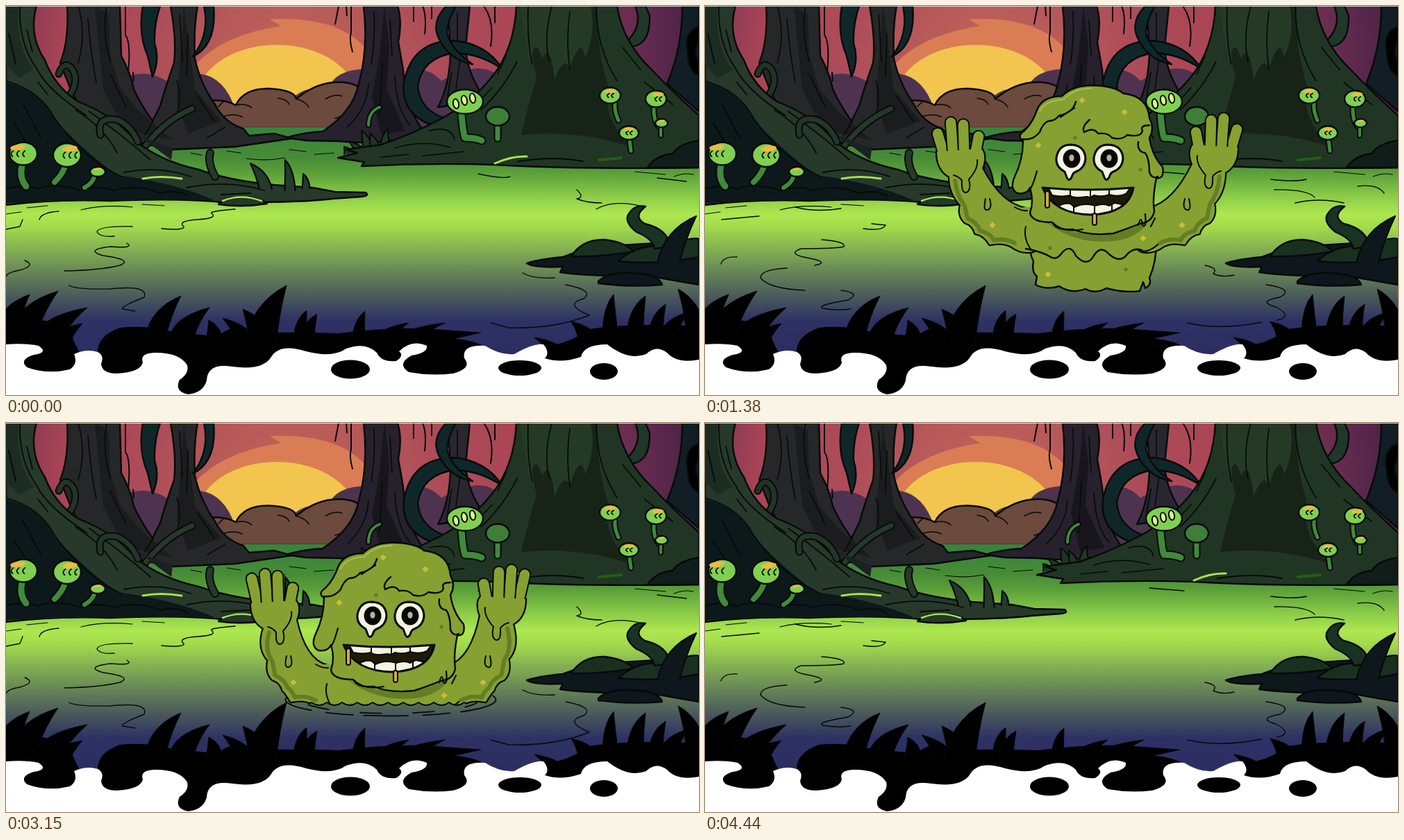
Write an HTML page with a canvas that moves like this. It is 998x561 px and loops after 4500 ms.

```html
<!DOCTYPE html>
<html lang="en">
<head>
<meta charset="utf-8">
<title>Swamp</title>
<style>
html, body { margin: 0; width: 100%; height: 100%; overflow: hidden; background: #fff }
canvas { display: block; width: 100vw; height: 100vh }
</style>
</head>
<body>
<canvas id="stage" width="998" height="561"></canvas>
<script>
const W = 998, H = 561, LOOP = 4500;
const INK = '#060a08', SLIME = '#86a131', SHADE = '#657d25', BONE = '#f5f3e1', GOLD = '#d9a838';
const GLOW = '#a8e44d', MOSS = '#213525', BANK = '#26392b', DARK = '#0c181a', TEAL = '#10272a', CAP = '#80d050', STEM = '#3f8a3b';
let g;

const layer = () => Object.assign(document.createElement('canvas'), { width: W, height: H });
const use = canvas => {
  g = canvas.getContext('2d');
  g.lineCap = g.lineJoin = 'round';
  return g;
};
const fill = (d, c) => { g.fillStyle = c; g.fill(new Path2D(d)); };
const ink = (d, w = 2, c = INK) => { g.lineWidth = w; g.strokeStyle = c; g.stroke(new Path2D(d)); };
const shape = (d, c, w = 2.4) => { fill(d, c); ink(d, w); };
const tube = (d, w, c) => { ink(d, w + 4); ink(d, w, c); };
const oval = (x, y, rx, ry, c, w = 0, turn = 0) => {
  g.beginPath();
  g.ellipse(x, y, rx, ry, turn, 0, 7);
  g.fillStyle = c; g.fill();
  if (w) { g.lineWidth = w; g.strokeStyle = INK; g.stroke(); }
};
const mirrored = (width, paint) => {
  g.save(); g.translate(width, 0); g.scale(-1, 1);
  paint();
  g.restore();
};
// A crescent leaf: the back edge bulges, the edge under the tip is hollow.
const blade = (x, y, w, tx, ty, c = '#000', line = 1) => {
  const dx = tx - x, dy = ty - y, half = (dx < 0 ? -w : w) / 2;
  shape(`M${x - half} ${y}Q${x - half + dx * .25} ${y + dy * .7} ${tx} ${ty}Q${x + half * .5 + dx * .4} ${y + dy * .5} ${x + half} ${y}`, c, line);
};
const ramp = (gradient, stops) => {
  for (const [at, c] of stops) gradient.addColorStop(at, c);
  return gradient;
};

function mushroom(x, y, rx, ry, stem, w, marks = 2, shift = 0) {
  tube(stem, w, STEM);
  oval(x, y, rx, ry, CAP, 2.4);
  oval(x + shift, y - ry * .55, rx * .55, ry * .24, '#f0b944', 0, -.12);
  for (let i = 0; i < marks; i++) {
    const mx = x + shift + (i - (marks - 1) / 2) * rx * .42;
    ink(`M${mx + 2} ${y - ry * .25}Q${mx - 4} ${y} ${mx + 1} ${y + ry * .25}`, 1.8);
  }
}

function sky() {
  g.fillStyle = ramp(g.createRadialGradient(410, 100, 60, 420, 80, 560), [
    [0, '#bd6159'], [.3, '#ad4c59'], [.55, '#a94554'], [.7, '#843655'], [.93, '#5a284c'], [1, '#4e2447']]);
  g.fillRect(0, 0, W, 190);
  fill('M250 120Q282 46 396 29L380 19Q482 14 522 66V130Z', '#da7d55');
  oval(390, 138, 117, 82, '#f2c54e');
  fill('M155 112Q198 82 240 114V180H155ZM262 98Q306 92 326 138V180H262ZM412 134Q432 113 462 122Q474 90 520 91V180H412ZM575 100Q604 82 627 108Q680 78 705 98Q740 90 744 110V175H575Z', '#4d3350');
  shape('M260 176V148Q300 127 331 143Q342 119 378 119Q416 121 418 134Q450 107 486 110Q506 112 514 122V176Z', '#6c4a3e');
  ink('M331 143Q346 140 354 147M392 133Q404 134 408 142M310 160Q330 154 340 160M418 134Q432 138 436 146M460 134Q474 126 484 130M474 162L496 155', 1.5);
}

function water() {
  g.fillStyle = ramp(g.createLinearGradient(0, 175, 0, 500), [
    [0, '#36843c'], [.13, '#478b37'], [.2, '#5a9f39'], [.3, '#88c947'], [.385, '#ade750'], [.44, '#a3dc4b'],
    [.53, '#86b551'], [.64, '#688656'], [.75, '#4a5a5b'], [.86, '#2d3164'], [1, '#2b2e61']]);
  g.fillRect(0, 175, W, 330);
}

function backTrees() {
  shape('M88 0Q91 50 78 82L95 125 130 185 240 207 330 203Q372 197 412 191L386 184 350 187 342 177Q314 168 301 142Q280 112 272 76Q270 30 276 0H237Q246 50 242 82Q230 116 222 144L211 166Q194 142 184 120Q180 98 166 72L164 0Z', '#252728');
  fill('M128 0L148 12 150 70 164 118 190 150 240 194 170 178 140 120ZM256 0L264 58 272 120 310 166 262 184 246 140Z', '#1a1c1e');
  ink('M104 0Q116 40 104 82M118 18Q122 70 130 110M145 0Q138 36 150 80M150 98L173 146M250 12L254 80M262 40L260 102M246 108Q256 140 240 170M276 130L300 166M212 166L200 186M315 175L290 190M306 145L313 138', 1.6);
  shape('M636 0L640 62Q640 112 622 146L692 136Q664 100 662 60L668 0Z', '#292630');
  ink('M650 10V62M654 75L648 120M642 95L636 130', 1.6);
  shape('M515 0Q522 62 508 112Q500 152 456 181Q424 183 404 190L432 194 480 195Q540 202 604 184Q575 148 572 92L565 52Q571 22 564 0Z', '#26212c');
  fill('M545 0L552 60 548 120 575 180 540 185 527 130 538 70Z', '#18161d');
  ink('M530 8Q532 48 526 84M553 20L556 72M522 112Q520 148 492 174M542 84L538 158M560 100Q562 150 582 172', 1.6);
  shape('M197 0Q190 40 204 72L211 102Q222 78 214 54Q213 26 222 0Z', TEAL);
  shape('M285 0Q294 40 269 73Q304 56 299 0Z', TEAL);
  shape('M622 174Q568 160 573 110Q585 50 645 50Q692 54 715 91Q682 68 645 68Q600 74 593 115Q596 150 632 162Z', TEAL);
  shape('M634 0Q612 22 623 46Q638 78 672 84Q640 62 635 38Q636 20 648 0Z', TEAL);
  shape('M906 0Q920 32 886 58Q928 66 927 14L921 0Z', '#20372a');
  shape('M974 0Q974 60 952 112L998 152V0Z', '#121e26');
  shape('M998 30Q976 38 982 66Q982 94 998 100V82Q988 66 998 50Z', '#000');
  ink('M172 0V42Q180 52 176 96M183 96L184 108M497 0V38Q494 48 499 66M479 0L474 26M587 0V22M600 0Q606 14 603 40M613 0V18M688 0Q704 22 698 58M704 0V24M490 0L491 14', 2);
}

function rightBank() {
  tube('M522 172Q522 152 538 146', 4, STEM);
  for (const [x, tx, ty] of [[495, 487, 203], [512, 494, 195], [522, 512, 180], [532, 524, 184], [545, 550, 177]])
    blade(x, 214, 16, tx, ty, MOSS, 2);
  shape('M735 0Q732 62 700 102Q670 140 624 164Q582 186 540 200L490 207 506 212 478 219 516 225 512 231Q610 226 705 229Q830 236 998 233V158Q960 124 930 92Q888 52 880 0Z', MOSS);
  fill('M764 0Q752 60 764 104Q752 142 742 186Q826 178 902 204Q856 160 868 118Q850 64 852 0Z', '#172316');
  fill('M740 0L754 82Q762 40 772 76Q784 50 790 106Q804 70 812 90Q828 40 834 74Q850 40 842 0Z', '#243a26');
  ink('M752 0Q750 50 758 84M786 0Q774 44 782 80M812 8Q806 50 812 92M850 0Q850 60 880 108M736 80Q716 120 684 150M720 72L708 98M610 180Q640 172 646 192M560 205Q600 192 640 204M600 216L660 210M888 60L914 92M920 110L960 142M700 118L670 150M540 218L580 214', 1.7);
  shape('M924 233Q936 215 960 213Q970 198 998 194V233Z', '#111d1b');
  ink('M704 227Q728 216 750 217', 3, GLOW);
  ink('M738 224Q790 216 831 224', 2);
  ink('M854 222L886 219', 4, '#245f0d');
  tube('M656 155Q658 182 661 190Q676 190 685 194', 9, STEM);
  oval(661, 138, 26, 17.5, CAP, 2.4);
  for (const [x, y] of [[648, 141], [660, 136], [672, 133]]) oval(x, y, 4, 7, '#dcf58b', 2, -.2);
  tube('M708 170V191', 7, STEM);
  oval(708, 159, 17, 13.5, '#3f7e39', 2.4);
  mushroom(870, 129, 15, 11.5, 'M877 141Q876 152 882 165', 5);
  mushroom(936, 134, 15, 12, 'M933 146Q932 164 940 174', 5, 2, 3);
  mushroom(944, 169, 9, 6, 'M943 176V187', 4, 0);
  mushroom(897, 183, 14, 10, 'M898 194L900 209', 5);
}

function leftBank() {
  tube('M82 142Q108 112 96 92Q84 76 76 98', 7, MOSS);
  tube('M192 214Q222 168 268 148', 7, '#25382a');
  fill('M190 186L240 206 238 222Z', '#1b2023');
  shape('M44 0Q32 42 56 78Q70 116 104 138Q156 158 186 194Q222 224 278 236Q322 252 386 258L442 262 474 268 518 269Q524 274 512 275L470 278Q420 284 310 283Q250 277 150 281Q70 278 0 287V0Z', BANK);
  fill('M0 110Q50 122 74 168Q118 214 160 244Q240 254 300 280Q150 279 0 284Z', DARK);
  fill('M0 0H18Q14 60 40 92L18 104 0 84Z', '#1c2c23');
  ink('M0 108Q50 122 70 162Q112 220 166 246M20 0Q18 54 44 90Q60 122 116 158M4 40L14 84M30 34L38 66M46 110L60 128M24 140L50 190M12 170L30 198M100 150Q142 176 160 212M120 152Q172 190 208 222M170 240Q220 230 266 246M260 262Q320 250 372 266M310 272L352 270M0 264Q24 256 46 264Q70 254 108 266Q132 258 156 266Q190 256 222 270Q246 264 262 274', 1.8);
  tube('M136 186Q130 158 160 164Q180 172 190 196', 7, '#22362a');
  tube('M301 246Q290 226 294 212', 8, BANK);
  for (const [x, y, w, tx, ty] of [[374, 264, 18, 352, 227], [409, 266, 15, 402, 222], [432, 263, 11, 428, 242]])
    blade(x, y, w, tx, ty, BANK, 2.2);
  ink('M197 249Q222 244 253 249', 3, GLOW);
  shape('M306 286Q316 275 341 275Q366 276 376 285Q340 291 306 286Z', '#22392a');
  ink('M312 281Q338 270 368 281', 2.6, GLOW);
  mushroom(25, 213, 20, 16.5, 'M23 231Q19 248 29 260', 9, 3, -8);
  mushroom(88, 215, 20, 17, 'M84 234Q80 244 70 254', 8, 3, 4);
  mushroom(132, 239, 11, 7, 'M127 247Q124 256 113 262', 6, 0);
}

function island() {
  shape('M750 371Q768 365 802 362L840 348Q900 344 998 338V402Q962 396 930 390Q840 390 798 384L802 376Q760 378 750 371Z', '#0d171c');
  shape('M814 361Q830 336 862 337Q890 340 904 354Q860 362 814 361ZM882 368Q908 343 946 347Q990 332 998 336V362Q940 374 882 368Z', '#193021');
  shape('M934 350Q932 336 908 326Q888 310 898 298Q906 286 921 289Q902 304 920 314Q954 322 956 347Z', '#193323');
  blade(954, 370, 32, 994, 303, '#0d171c', 2);
  shape('M853 397Q866 384 898 385Q940 386 945 402Q900 406 853 400Z', '#0d171c');
}

function foreground() {
  fill('M0 455Q50 446 92 464Q96 484 108 503L132 502Q130 476 164 464Q204 460 240 470L300 476Q360 468 480 472Q560 462 618 466L686 471 646 480Q688 482 704 506L780 500 768 492Q812 488 838 466Q910 456 998 462V561H0Z', '#000');
  for (const b of [
    [2, 464, 34, 34, 416], [26, 468, 40, 75, 411], [64, 472, 42, 117, 435], [76, 484, 34, 110, 458],
    [216, 474, 30, 252, 418], [254, 474, 36, 293, 435], [300, 482, 24, 292, 453], [312, 484, 22, 336, 462],
    [346, 484, 28, 312, 450], [366, 484, 32, 341, 437], [366, 490, 46, 404, 403], [424, 478, 20, 433, 439],
    [434, 480, 20, 448, 444], [508, 478, 18, 517, 440], [548, 476, 26, 580, 457], [582, 478, 34, 632, 457],
    [790, 496, 24, 761, 478], [836, 476, 26, 814, 455], [870, 470, 22, 875, 416], [906, 470, 24, 921, 418],
    [936, 470, 20, 950, 430], [954, 472, 24, 984, 441], [994, 470, 28, 968, 408]]) blade(...b);
  fill('M0 488Q28 486 47 490Q62 500 40 503Q18 510 30 521Q60 532 92 524Q104 516 98 502Q116 494 132 499Q142 504 137 516Q138 530 160 530Q194 528 197 514Q192 500 216 500Q250 500 261 518Q264 530 250 539Q242 556 262 560Q284 558 289 540Q290 514 326 520Q370 526 382 506Q394 486 432 498Q470 508 490 494Q518 484 534 500Q540 514 562 512Q574 504 566 498Q584 480 606 490Q608 500 584 504Q562 516 580 528Q612 534 644 530Q672 522 660 508Q656 488 690 490Q712 504 732 502Q760 486 774 488Q784 500 776 508Q800 516 828 506Q832 488 866 488Q896 512 922 502Q936 488 952 500Q966 516 998 510V561H0Z', '#fff');
  oval(496, 524, 28, 13.5, '#000');
  oval(740, 522, 31, 11, '#000');
  oval(861, 527, 20, 12, '#000');
}

const FAR_WAVES = 'M266 212L282 215M318 209L338 212M346 220Q374 224 402 219M408 207L432 210M444 214L472 212M0 300L22 297M30 291L60 288M108 294Q140 286 182 290M196 286L228 288M906 239L950 243M962 246Q976 240 990 243';
const WAVES = [
  'M174 342Q186 350 150 347Q112 352 140 360Q184 366 164 374Q136 381 84 382M91 403Q100 409 150 408Q206 402 199 420Q164 434 168 437L186 440M182 318Q132 317 131 326Q136 334 156 332M224 321Q258 324 256 318Q246 310 276 308Q306 306 296 299Q292 296 330 293M27 367Q44 374 20 381Q2 384 0 390M0 322L20 318 24 308M48 308Q50 298 76 296M680 242Q716 250 726 246M822 265Q834 276 822 278Q836 284 858 284M850 293Q876 278 920 290M938 248L980 253M744 385Q760 394 790 392M806 402Q848 410 832 422Q802 430 840 446Q790 466 724 464L698 457',
  'M168 337Q204 340 200 347Q190 350 138 350Q116 358 152 364Q180 370 158 374M118 378Q80 380 80 392Q92 408 144 410M196 410Q226 414 206 424Q158 432 170 436Q190 440 210 437M23 372Q26 361 46 362M228 321Q256 325 260 316L240 314M130 290Q160 298 196 292M24 308L78 303M640 238L690 242M815 250Q850 254 866 250M820 265Q866 264 878 276M850 284Q884 276 920 284M940 260Q968 256 978 270M720 374Q740 378 732 386Q744 392 762 388M808 402Q850 408 828 420Q794 426 822 434Q848 448 824 453M695 457Q740 468 802 456',
  'M222 308Q264 314 263 321Q240 328 194 325M130 330Q192 340 188 346Q180 350 158 348M25 373Q44 377 25 386M82 395Q80 384 112 380M155 370L164 367M116 408Q150 413 185 410Q200 418 200 426M168 438Q182 441 192 437M50 306L72 302M140 294L186 290M700 240Q730 238 746 244M812 262Q844 262 848 275M856 256Q886 268 926 262M874 288L914 286M946 272L984 276M737 382Q736 378 744 377M800 400Q854 408 838 420Q804 430 838 445Q800 474 710 457'];

function ripple(cx, cy, rx, ry) {
  g.lineWidth = 1.8; g.strokeStyle = INK;
  for (const k of [1, .84]) {
    g.setLineDash(k === 1 ? [rx * .42, rx * .1, rx * .26, rx * .14] : [rx * .2, rx * .3]);
    g.beginPath();
    g.ellipse(cx, cy, rx * k, ry * k, 0, -.25, Math.PI + .3);
    g.stroke();
  }
  g.setLineDash([]);
}

const speck = (x, y, c = '#cbbd3c', r = 4.5) => fill(`M${x - r} ${y}L${x} ${y - r}L${x + r} ${y}L${x} ${y + r}Z`, c);

function mound(sx, sy) {
  g.save();
  g.translate(562, 392); g.scale(sx, sy); g.translate(-562, -392);
  shape('M445 385Q478 372 488 352Q524 344 542 324Q562 316 582 332Q600 336 608 350Q636 356 642 370Q658 382 683 384Q676 392 650 389Q624 386 600 395Q584 386 570 391Q556 402 546 397Q530 392 520 402Q514 386 494 388Q466 392 445 385Z', SLIME);
  ink('M486 353Q500 352 505 359Q516 342 524 352Q536 346 538 364Q548 374 560 362Q566 376 578 374Q590 360 600 372Q606 364 620 366M540 326Q532 338 544 343Q554 330 560 344Q574 338 582 350Q594 344 606 352', 2);
  ink('M494 348Q520 340 546 324M588 340L602 350', 2, '#a9bb45');
  speck(560, 331); speck(510, 357); speck(604, 377); speck(538, 384, SHADE); speck(640, 379);
  g.restore();
}

// Fingers go over the outline of the limb and under its fill, so they grow out of the palm.
function limb(outline, fingers) {
  ink(outline, 4.5);
  for (const f of fingers) tube(f, 14.5, SLIME);
  fill(outline, SLIME);
}

function arm(s, lift) {
  const y = -s * .42 - lift, m = s / 2, n = y / 3;
  const finger = (x, y0, tx, ty) => `M${x + s} ${y0 + y}L${tx + s} ${ty + y}`;
  limb(`M${334 + s} ${210 + y}Q${334 + s} ${236 + y} ${352 + s} ${246 + y}Q${352 + m} ${270 + n} ${368 + m} ${287 + n}Q${364 + m} 302 ${374 + m} 312Q${386 + m} 316 ${389 + m} 328Q402 330 410 344Q428 340 440 346Q456 358 472 354L510 330 462 292Q${426 + m / 2} ${286 + n} ${399 + s} ${234 + y}Q${406 + s} ${216 + y} ${398 + s} ${206 + y}Z`,
    [finger(344, 214, 335, 184 - s * .5), finger(357, 208, 354, 168), finger(373, 208, 372, 171), finger(388, 220, 394, 188)]);
  ink(`M${360 + s} ${252 + y}Q${362 + m} ${272 + n} ${374 + m} ${288 + n}L${378 + m} 306Q${392 + m} 312 ${396 + m} 324Q412 328 416 338Q432 334 446 342`, 6, SHADE);
  ink(`M${358 + s} ${244 + y}Q${366 + s} ${246 + y} ${370 + s} ${252 + y}Q${369 + s} ${270 + y} ${376 + s} ${269 + y}Q${384 + s} ${266 + y} ${380 + s} ${250 + y}Q${394 + s} ${234 + y} ${392 + s} ${222 + y}M404 278Q400 296 407 294Q414 292 410 278`, 2);
  speck(414, 316);
}

function meltedArm() {
  limb('M324 220Q326 240 336 250Q334 280 341 282Q348 272 346 252L354 256Q354 280 363 296Q362 336 373 340Q380 332 378 312Q392 316 394 332Q404 318 412 328Q416 358 424 342Q436 330 444 348Q456 356 476 350L520 310 464 268Q402 264 375 218L360 210 338 208Z',
    ['M338 230L329 216', 'M342 218L336 190', 'M352 214L348 178', 'M366 222L371 186']);
  ink('M352 232Q364 240 358 256Q366 262 368 250Q374 262 384 264M392 264Q388 282 396 280Q402 272 408 278Q412 296 418 280Q424 268 432 274Q434 296 442 290Q444 274 456 270M386 300Q420 316 444 322', 2);
}

function eye(x, dot) {
  shape(`M${x - 9} 239Q${x - 22} 232 ${x - 21} 219Q${x - 18} 200 ${x} 200Q${x + 20} 201 ${x + 21} 220Q${x + 20} 234 ${x + 7} 239Q${x + 3} 240 ${x + 1} 247Q${x - 3} 254 ${x - 6} 247Z`, BONE, 3);
  oval(x + 1, 220, 12.5, 13.5, '#080803');
  oval(x + 1, 219, 3.6, 4.8, dot);
}

function face(melted) {
  const dot = melted ? '#35331f' : '#b5b29a';
  eye(527, dot); eye(581, dot);
  g.save();
  if (melted) { g.translate(554, 272); g.scale(.84, .76); g.translate(-552, -281); }
  const mouth = new Path2D('M486 262Q550 268 617 262Q610 299 556 301Q502 300 486 262Z');
  g.fillStyle = '#1c1907'; g.fill(mouth);
  g.save(); g.clip(mouth);
  shape('M492 258L500 273Q514 276 526 273Q530 278 550 275Q556 277 560 273Q572 276 582 272Q596 276 606 271L616 258ZM508 300V290Q514 284 526 285L532 290Q544 284 558 287L562 288Q574 284 582 288L590 284 600 286 604 304H508Z', BONE, 2);
  ink('M526 258V273M555 258V274M582 258V272M531 288V303M561 287V303M586 287V303', 2);
  g.restore();
  g.lineWidth = 3; g.strokeStyle = INK; g.stroke(mouth);
  tube('M493 270V288', 4, GOLD);
  tube('M561 302V313', 4, GOLD);
  g.restore();
}

function creature(dy, reach, melted) {
  g.save();
  g.translate(0, dy);
  shape('M470 340Q466 356 473 368Q470 384 478 390L476 402Q492 410 510 404Q528 416 548 408Q562 416 578 407Q604 414 626 411L631 398 634 407Q644 402 640 392Q650 370 650 340Z', SLIME);
  if (melted) {
    meltedArm();
    mirrored(1118, meltedArm);
  } else {
    arm(reach, 0);
    mirrored(1101, () => arm(reach, 6));
  }
  const hem = 'M462 350Q484 354 496 361Q506 368 514 356Q526 342 534 360Q550 378 560 360Q570 344 582 358Q598 372 608 358Q620 346 632 354Q644 352 652 344';
  fill(hem + 'L648 290H458Z', SLIME);
  ink(hem, 2.4);
  ink('M446 290Q456 296 464 295M462 318Q458 336 470 352M642 318L648 306', 2);
  fill('M482 304Q540 352 640 302Q634 330 596 338Q530 348 482 304Z', SHADE);
  shape('M478 150Q486 130 514 130Q532 112 568 115Q592 117 602 126Q638 130 640 162Q648 176 640 190Q644 216 659 232Q662 250 650 248Q644 278 647 296Q644 312 626 314Q606 322 588 328Q552 332 530 322Q506 324 500 312Q470 312 468 298Q474 282 468 262Q464 272 450 270Q438 264 446 246Q458 222 458 194Q448 188 460 180Q472 168 478 150Z', SLIME);
  ink('M482 152Q490 136 516 135Q532 118 556 119', 2, '#a9bd4c');
  if (melted) ink('M516 160Q524 156 528 172Q536 182 542 168Q550 150 560 154Q566 166 574 156Q586 146 590 166Q598 182 608 168M622 178Q616 196 628 200Q626 226 634 226M474 180Q462 192 474 198Q488 188 492 214Q480 222 484 240Q474 252 478 268', 2.4);
  else ink('M534 138Q530 154 510 158Q504 166 494 166Q486 170 482 182Q472 194 458 192M532 147L512 160M554 164Q542 174 546 182Q560 174 566 184Q580 182 586 190Q600 194 608 186Q628 190 630 180Q626 172 640 172M624 196Q622 210 634 212Q640 220 640 240Q644 250 652 246', 2.4);
  ink('M478 238Q472 260 468 264M500 312Q516 328 544 322M624 316Q628 300 630 316Q636 322 634 300', 2.2);
  for (const [x, y] of [[543, 136], [604, 153], [480, 201], [494, 387], [631, 335]]) speck(x, y);
  for (const [x, y] of [[533, 190], [606, 380], [497, 349], [627, 236]]) speck(x, y, SHADE, 3.5);
  face(melted);
  g.restore();
}

// Cuts the drawn creature off at a scalloped water line.
function submerge(y) {
  let line = `M0 ${y}`;
  for (let x = 0; x < W; x += 22) line += 'q11 8 22 0';
  g.globalCompositeOperation = 'destination-in';
  fill(line + 'V0H0Z', '#000');
  g.globalCompositeOperation = 'source-atop';
  ink(line, 4);
  g.globalCompositeOperation = 'source-over';
}

const back = layer(), front = layer(), sprite = layer();
use(back);
sky(); water(); backTrees(); rightBank(); leftBank(); island();
g.fillStyle = 'rgba(255,255,255,.7)'; g.fillRect(0, 0, W, 1);
use(front);
foreground();
const stage = document.getElementById('stage');

const GROW = [0, .12, .3, .5, .68, .85, 1, 1.16];
const RISE = { 8: 125, 9: 66, 10: 22 };
const SINK = [11, 24, 40, 58, 78, 98, 119, 160, 215];

function pose(t) {
  if (t < 990) {
    const k = Math.floor(t / 90);
    return k < 8 ? { grow: GROW[k], tall: k === 7 ? 1.7 : GROW[k] } : { dy: RISE[k], melted: true };
  }
  if (t < 2790) return { dy: 0, reach: Math.floor((t - 990) / 300) % 2 ? 0 : 19 };
  const k = Math.floor((t - 2790) / 120);
  return k < SINK.length ? { dy: SINK[k], reach: 19, sinking: k } : { fade: k - SINK.length };
}

function draw(now) {
  const t = now % LOOP, p = pose(t);
  use(stage);
  g.drawImage(back, 0, 0);
  ink(FAR_WAVES, 1.2);
  ink(WAVES[Math.floor((t + 20) / 200) % 3], 1.4);

  if (p.grow) {
    ripple(564, 386, 137 * p.grow, 20 * p.grow);
    mound(p.grow, p.tall);
    if (p.grow === 1) {
      oval(418, 357, 4, 3, SLIME, 2);
      oval(516, 316, 3.4, 2.4, SLIME, 2, .6);
    }
  } else if (p.dy !== undefined) {
    if (p.sinking !== undefined) {
      const k = Math.min(1, p.sinking / 6);
      ripple(560 - 12 * k, 393 + 12 * k, 98 + 107 * k, 21 + 5 * k);
    } else if (p.dy > 30) ripple(556, 402, 160, 22);
    use(sprite).clearRect(0, 0, W, H);
    creature(p.dy, p.reach, p.melted);
    if (p.dy) submerge(p.melted ? 414 : 404);
    use(stage).drawImage(sprite, 0, 0);
  } else if (p.fade < 4) ripple(552, 404, 140 - p.fade * 32, 20 - p.fade * 4);

  g.drawImage(front, 0, 0);
}

function tick() {
  draw(performance.now());
  requestAnimationFrame(tick);
}
tick();
</script>
</body>
</html>
```
